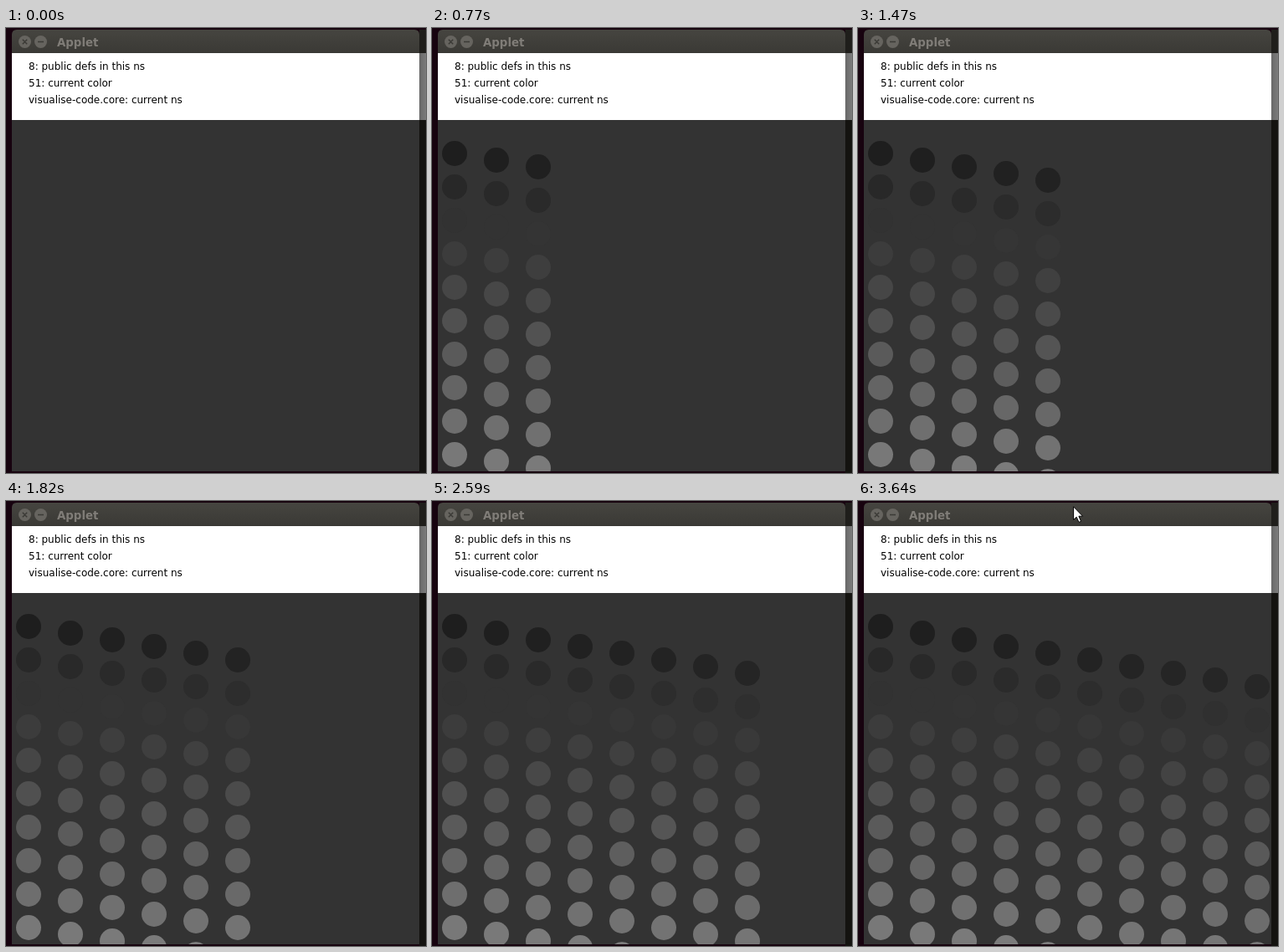
An HTML page that plays this animation: 502 px wide and 532 px high, repeating every 3.71 s.

```html
<!DOCTYPE html>
<html lang="en">
<head>
<meta charset="utf-8">
<title>Applet</title>
<style>
  html, body { margin: 0; width: 100%; height: 100%; overflow: hidden; background: #17030f; }
  svg { display: block; width: 502px; height: 532px; }
  text { font: 12px "DejaVu Sans", sans-serif; }
  .title { font-size: 13.33px; font-weight: bold; fill: #807d78; }
  .buttons circle { fill: #66645f; }
  .buttons path { stroke: #3b3a36; stroke-width: 1.5; }
</style>
</head>
<body>
<svg viewBox="0 0 502 532">
  <defs>
    <linearGradient id="bar" x2="0" y2="1">
      <stop stop-color="#464540"/>
      <stop offset="1" stop-color="#3a3935"/>
    </linearGradient>
    <linearGradient id="shade">
      <stop stop-color="#686868"/>
      <stop offset="1" stop-color="#7c7c7c"/>
    </linearGradient>
    <clipPath id="pane"><rect x="7" y="110" width="487" height="420"/></clipPath>
  </defs>

  <rect width="502" height="532" fill="#17030f"/>
  <rect x="494" y="2" width="8" height="530" fill="#141310"/>
  <rect x="494" y="2" width="8" height="28" fill="#1f1e1b"/>
  <rect x="494" y="30" width="8" height="80" fill="url(#shade)"/>

  <path d="M7 30V8Q7 2 13 2H488Q494 2 494 8V30Z" fill="url(#bar)"/>
  <g class="buttons">
    <circle cx="22.5" cy="16.5" r="7.5"/>
    <circle cx="41.5" cy="16.5" r="7.5"/>
    <path d="M19.8 13.8l5.4 5.4m0-5.4l-5.4 5.4M38 16.5h7"/>
  </g>
  <text class="title" x="61" y="21.5">Applet</text>

  <rect x="7" y="30" width="487" height="80" fill="#fff"/>
  <text x="27" y="50">8: public defs in this ns</text>
  <text x="27" y="70">51: current color</text>
  <text x="27" y="90">visualise-code.core: current ns</text>

  <rect x="7" y="110" width="487" height="420" fill="#333"/>
  <g id="dots" clip-path="url(#pane)"></g>
  <path id="pointer" d="M257.6 6.8V22.4L261.2 19.2L264 25.4L266.6 24.3L263.9 18.2H268.6Z"
        fill="#fff" stroke="#000" stroke-linejoin="round"/>
</svg>
<script>
  const LOOP = 3710;
  const columnTimes = [140, 490, 770, 1190, 1470, 1820, 2240, 2590, 2870, 3220];
  const dots = document.getElementById("dots");

  function make(name, attrs, parent) {
    const node = document.createElementNS("http://www.w3.org/2000/svg", name);
    for (const key in attrs) node.setAttribute(key, attrs[key]);
    return parent.appendChild(node);
  }

  const steps = columnTimes.map((time, col) => {
    const node = make("g", {}, dots);
    for (let row = 0; row < 10; row++) {
      const gray = 30 + 10 * row + col;
      make("circle", {
        cx: 27 + 50 * col,
        cy: 150 + 8 * col + 40 * row,
        r: 15,
        fill: `rgb(${gray},${gray},${gray})`
      }, node);
    }
    return { node, time };
  });
  steps.push({ node: document.getElementById("pointer"), time: 3640 });

  function draw(t) {
    for (const { node, time } of steps) {
      node.style.visibility = t >= time ? "visible" : "hidden";
    }
  }

  const start = performance.now();
  function tick() {
    draw((performance.now() - start) % LOOP);
    requestAnimationFrame(tick);
  }
  tick();
</script>
</body>
</html>
```
